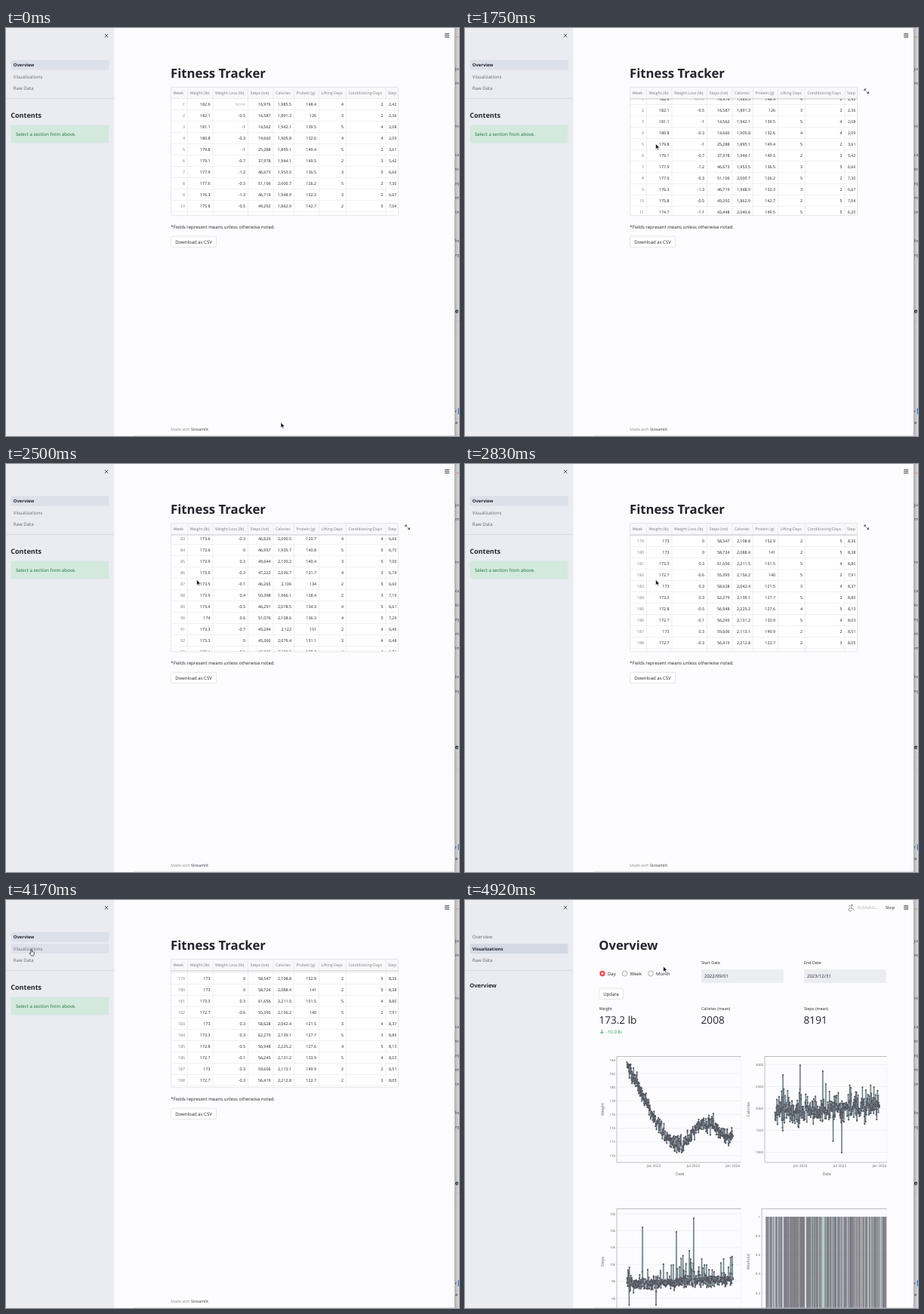
Write an HTML page that moves like this. It is 600 px wide and 541 px high and loops after 5000 ms.

```html
<!DOCTYPE html>
<html lang="en">
<head>
<meta charset="utf-8">
<title>Fitness Tracker</title>
<style>
html, body { margin: 0; width: 100%; height: 100%; overflow: hidden; background: #fcfbfe; }
svg { display: block; width: 600px; height: 541px; }
text { font-family: 'Open Sans', 'Noto Sans', sans-serif; fill: #23242d; text-rendering: geometricPrecision; white-space: pre; }
</style>
</head>
<body>
<svg id="stage" viewBox="0 0 600 541" xmlns="http://www.w3.org/2000/svg"></svg>
<script>
const LOOP = 5000, STEPS = 60;
const MUTED = '#777882', AXIS = '#62636d', FAINT = '#b0b0b8';

// ---------- drawing helpers ----------
const text = (x, mid, str, size, attrs = '') =>
  `<text x="${x}" y="${(mid + size * 0.36).toFixed(2)}" font-size="${size}" ${attrs}>${str}</text>`;
const rect = (x, y, w, h, fill, attrs = '') =>
  `<rect x="${x}" y="${y}" width="${w}" height="${h}" fill="${fill}" ${attrs}/>`;
const line = (d, color, width = 0.6, attrs = '') =>
  `<path d="${d}" fill="none" stroke="${color}" stroke-width="${width}" ${attrs}/>`;
const group = (id, body, attrs = '') => `<g id="${id}" ${attrs}>${body}</g>`;
const button = (x, y, w, label) =>
  rect(x, y, w, 14.3, '#fff', 'rx="1.8" stroke="#d5d5db" stroke-width=".6"') +
  text(x + w / 2, y + 7.2, label, 6.05, MID);
const END = 'text-anchor="end"', MID = 'text-anchor="middle"';
const BOLD = 'font-weight="700"', SEMI = 'font-weight="600"', MEDIUM = 'font-weight="500"';
const tint = c => `style="fill:${c}"`;

function random(seed) {
  return () => {
    seed = (seed + 0x6d2b79f5) | 0;
    let v = Math.imul(seed ^ (seed >>> 15), 1 | seed);
    v = (v + Math.imul(v ^ (v >>> 7), 61 | v)) ^ v;
    return ((v ^ (v >>> 14)) >>> 0) / 4294967296;
  };
}

// Linear interpolation in rows of [key, ...values]
function along(keys, k) {
  const i = keys.findIndex(row => row[0] >= k);
  if (i < 0) return keys[keys.length - 1].slice(1);
  if (i === 0) return keys[0].slice(1);
  const a = keys[i - 1], b = keys[i], u = (k - a[0]) / (b[0] - a[0]);
  return a.slice(1).map((v, j) => v + (b[j + 1] - v) * u);
}

// ---------- table ----------
const WEEKS = 188, ROW = 15;
const edges = [218.5, 240.5, 274, 320.5, 354, 381.5, 414.5, 450.5, 503];
const heads = ['Week', 'Weight (lb)', 'Weight Loss (lb)', 'Steps (tot)', 'Calories',
  'Protein (g)', 'Lifting Days', 'Conditioning Days', 'Steps (mean)'];
const number = v => v.toLocaleString('en-US', { maximumFractionDigits: 1 });
const tenth = v => Math.round(v * 10) / 10 + 0;

const weightTrend = [[1, 182.6], [5, 179.9], [10, 175.5], [16, 172.8], [21, 174], [WEEKS, 173]];
const stepTrend = [[1, 16976], [4, 14143], [7, 49003], [20, 39000], [WEEKS, 60000]];

function weekOf(n) {
  const r = random(n * 31), vary = n > 1 ? r() - 0.5 : 0;
  return {
    weight: tenth(along(weightTrend, n)[0] + vary * 0.8),
    steps: Math.round(along(stepTrend, n)[0] * (1 + vary * 0.14)),
    calories: tenth(1850 + n + r() * 200),
    protein: tenth(120 + r() * 34),
    lifting: 2 + Math.floor(r() * 4),
    conditioning: 2 + Math.floor(r() * 4)
  };
}

function tableRow(n, y) {
  const w = weekOf(n);
  const loss = n > 1 ? tenth(w.weight - weekOf(n - 1).weight) : null;
  const cells = [n, w.weight, loss, w.steps, w.calories, w.protein, w.lifting, w.conditioning];
  return cells.map((v, i) => {
    const color = i === 0 ? MUTED : v === null ? FAINT : '#1c1d26';
    return text(edges[i + 1] - 3.5, y, v === null ? 'None' : number(v), 5.35, `${END} ${MEDIUM} ${tint(color)}`);
  }).join('') + text(507, y, number(w.steps / 7), 5.35, MEDIUM) +
    line(`M218.5 ${y + ROW / 2}H519.5`, '#e7e7ec');
}

function tableRows(scroll) {
  let out = '';
  const first = Math.floor(scroll / ROW) + 1;
  for (let n = first; n <= Math.min(first + 11, WEEKS); n++) out += tableRow(n, 86 + ROW * n - scroll);
  return out;
}

const tablePage =
  text(218, 60, 'Fitness Tracker', 16.75, BOLD) +
  rect(218.5, 78.5, 301, 170.2, '#fff') +
  group('rows', '', 'clip-path="url(#body)"') +
  rect(218.5, 78.5, 301, 14.8, '#f8f8fb') +
  `<g clip-path="url(#head)">${heads.map((h, i) =>
    text(edges[i] + 3, 86.3, h, 5.25, tint(MUTED))).join('')}</g>` +
  line(edges.slice(1).map(x => `M${x} 78.5V248.7`).join(''), '#e4e4e9') +
  line('M218.5 93.6H519.5', '#dcdce2') +
  group('shade', rect(218.5, 93.6, 301, 2.4, 'url(#drop)')) +
  rect(218.5, 78.5, 301, 170.2, 'none', 'rx="1.5" stroke="#dcdce2" stroke-width=".7"') +
  group('expand', line('M529 83.4V81.1h2.3M529.2 81.3l2 2M534.6 84.2v2.3h-2.3M534.4 86.3l-2-2', '#3d3e48', 0.9)) +
  text(218.3, 264, '*Fields represent means unless otherwise noted.', 6.05) +
  button(218.5, 276.3, 60, 'Download as CSV') +
  text(218.3, 532.2, `Made with <tspan ${SEMI} ${tint('#62636d')}>Streamlit</tspan>`, 5.2, tint('#8c8d96'));

// ---------- charts ----------
const DAYS = 486;
const rnd = random(7), spread = () => rnd() + rnd() + rnd() - 1.5;
const rare = (chance, size) => rnd() < chance ? rnd() * size : 0;

// One value per day; peaks are a few outstanding [x, y] points
function series(x0, x1, peaks, value) {
  const pts = Array.from({ length: DAYS }, (_, i) => {
    const u = i / (DAYS - 1);
    return [x0 + (x1 - x0) * u, value(u)];
  });
  for (const [x, y] of peaks) pts[Math.round((x - x0) / (x1 - x0) * (DAYS - 1))][1] = y;
  const at = pts.map(p => p.map(v => v.toFixed(1)).join(' '));
  const path = 'M' + at.join('L');
  return line(path, '#5fb39a', 1.1, 'opacity=".45" transform="translate(-.4 0)"') +
    line(path, '#7f9fc6', 1.1, 'opacity=".4" transform="translate(.5 0)"') +
    line(path, '#53565f', 0.55) +
    line(at.map(p => `M${p}h0`).join(''), '#56555e', 2.2, 'stroke-linecap="round"');
}

function chart({ x, y, right, bottom, title, ticks, y0, dy, dates, data }) {
  const label = `${MID} ${tint(AXIS)}`, midX = x + (right - x) / 2 + 1.5;
  const titleX = x < 300 ? 182 : 375.5, titleY = y + 70;
  const months = ['Jan 2023', 'Jul 2023', 'Jan 2024'];
  return ticks.map((t, i) => line(`M${x} ${y0 + i * dy}H${right}`, '#e3e3e8', 0.5) +
      text(x - 2, y0 + i * dy, t, 4.4, `${END} ${tint(AXIS)}`)).join('') +
    line(`M${right} ${y}V${bottom}`, '#efeff3', 0.5) +
    line(`M${right} ${y}H${x}V${bottom}H${right}`, '#a3a4aa', 0.7) + data +
    text(titleX, titleY, title, 5.3, `transform="rotate(-90 ${titleX} ${titleY})" ${label}`) +
    (dates ? months.map((m, i) => text(dates + i * 52.3, 352.3, m, 4.7, label)).join('') +
      text(midX, 362.8, 'Date', 5.3, label) : '');
}

// Tick labels counting down from a top value
const countdown = (top, step, count, show = String) =>
  Array.from({ length: count }, (_, i) => show(top - i * step));

const weightLine = [[0, 220], [0.08, 237], [0.25, 288], [0.4, 318], [0.52, 326], [0.68, 297], [0.8, 299], [0.96, 318], [1, 310]];
const weightData = series(214.5, 355, [[287, 335], [329, 283]],
  u => along(weightLine, u)[0] + spread() * 11);
const calorieData = series(410.5, 549, [[444, 219], [474, 227], [487.5, 320], [499, 335]],
  u => 283 - 11 * u * u + spread() * 17 - rare(0.1, 24) - rare(0.02, 35) + rare(0.01, 25));
const stepData = series(214.5, 355, [[217.5, 537], [235, 434], [253, 537], [280, 440], [303, 422]],
  u => 511 - 8 * u + spread() * 8 - rare(0.16, 22) - rare(0.025, 45));

let bars = '';
for (let x = 398.5; x < 558; x += 0.66) {
  const hue = 150 + rnd() * 70, gap = rnd() < 0.2;
  bars += rect(x.toFixed(2), 420, 0.68, 122, gap ? `hsl(${hue} 25% ${55 + rnd() * 42}%)` : `hsl(265 5% ${34 + rnd() * 10}%)`);
}

// ---------- second page ----------
const radio = (x, label, on) =>
  `<circle cx="${x}" cy="97.5" r="3.4" fill="${on ? '#f2474b' : '#fff'}" stroke="${on ? '#f2474b' : '#85868f'}" stroke-width=".7"/>` +
  (on ? `<circle cx="${x}" cy="97.5" r="1.4" fill="#fff"/>` : '') + text(x + 7, 97.5, label, 6);
const dateField = (x, label, value) => text(x, 83.3, label, 5.35) +
  rect(x, 92, 109, 18, '#ecedf3', 'rx="1.8"') + text(x + 4, 101, value, 6);
const metric = (x, label, value) => text(x, 144, label, 5.3) + text(x - 0.4, 159, value, 13.6);

const formPart =
  text(177.3, 60, 'Overview', 16.6, BOLD) +
  radio(182, 'Day', true) + radio(211.5, 'Week') + radio(246, 'Month') +
  dateField(313, 'Start Date', '2022/09/01') + dateField(449, 'End Date', '2023/12/31') +
  button(177.5, 117.3, 32, 'Update');
const metricPart =
  metric(177.8, 'Weight', '173.2 lb') + metric(313, 'Calories (mean)', '2008') +
  metric(449, 'Steps (mean)', '8191') +
  line('M181.3 171.7v5.4M179 174.9l2.3 2.3 2.3-2.3', '#1f9c48', 0.8) +
  text(187, 174.5, '-10.0 lb', 6, `${MEDIUM} ${tint('#1f9c48')}`);
const thousands = v => v + 'k', decimal = v => String(tenth(v));
const chartPart =
  chart({ x: 201, y: 207.5, right: 365.5, bottom: 348, title: 'Weight', ticks: countdown(184, 2, 8),
    y0: 212, dy: 18.14, dates: 250, data: weightData }) +
  chart({ x: 397, y: 207.5, right: 558.5, bottom: 348, title: 'Calories', ticks: countdown(3000, 500, 5),
    y0: 218.5, dy: 29, dates: 444.2, data: calorieData }) +
  chart({ x: 201, y: 409.5, right: 365.5, bottom: 550, title: 'Steps', ticks: countdown(16, 2, 6, thousands),
    y0: 416, dy: 22.4, data: stepData }) +
  chart({ x: 393, y: 409.5, right: 558.5, bottom: 550, title: 'Workout', ticks: countdown(1, 0.2, 5, decimal),
    y0: 420, dy: 25.3, data: bars });

const running =
  `<circle cx="512.6" cy="6.8" r="1" fill="${MUTED}"/>` +
  line('M512 8.4l-1 2.8h2.8l1.4 2.6M508.3 8l2-.5 1.6 1M510 10.4a2.2 2.2 0 1 0 2.4 2.8', MUTED, 0.8) +
  text(519.8, 10, 'RUNNING...', 5.2, tint(FAINT)) + text(557, 10, 'Stop', 5.6);

// ---------- window around the pages ----------
const scraps = ['ju', 'me', '', '', 'ina', '', 'ca', 'tiv', 'ng', 'ma', 'im', '', 'he', 'ng'];
const behind =
  rect(594, 0, 6, 541, '#dcdcdf') + rect(594, 0, 6, 541, 'url(#edge)') +
  rect(595, 11.6, 5, 1, '#e08a62') +
  scraps.map((s, i) => text(595, 54 + i * 19, s, 5.6, tint('#3a3b40'))).join('') +
  text(594.8, 375, 'e', 8, BOLD) + line('M600 388.5H596V406H600', '#bbbbc0') +
  text(594.8, 508, 'r', 5.6) + rect(598.6, 504, 1.4, 8, '#4a86d0') + text(595, 523, 'a', 5.6);

const fade = (id, dir, alpha) => `<linearGradient id="${id}" ${dir}>
  <stop stop-opacity="${alpha}"/><stop offset="1" stop-opacity="0"/></linearGradient>`;

document.getElementById('stage').innerHTML = `<defs>
  <clipPath id="body"><rect x="218.5" y="93" width="298.7" height="155.5"/></clipPath>
  <clipPath id="head"><rect x="218.5" y="78" width="298.5" height="17"/></clipPath>
  ${fade('drop', 'x2="0" y2="1"', 0.13)}${fade('edge', '', 0.22)}</defs>` +
  rect(0, 0, 600, 541, '#fcfbfe') + behind + rect(0, 0, 143.3, 541, '#eaecf2') +
  line('M130.8 7.9l4.4 4.4M135.2 7.9l-4.4 4.4', '#2b2c36', 0.8) +
  group('nav', '') + rect(0, 93, 143.3, 1, '#d8dae1') +
  group('aside1', text(6.3, 115.5, 'Contents', 9, BOLD) + rect(6.5, 128.5, 130, 24, '#d3e9dd', 'rx="1.8"') +
    text(13, 140.7, 'Select a section from above.', 6.12, tint('#177233'))) +
  group('aside2', text(6.3, 113.2, 'Overview', 7.5, BOLD)) +
  group('table', tablePage) +
  group('form', formPart) + group('metrics', metricPart) + group('charts', chartPart) +
  group('running', running) +
  line('M581.2 7.7h6M581.2 9.9h6M581.2 12.1h6', '#2b2c36', 0.9) +
  line('M170 540.7H594', '#c9c9ce') +
  group('arrow', '<path d="M0 0V7.2L1.7 5.7 2.8 8.1 4 7.6 2.9 5.3H5.2Z" fill="#111" stroke="#fff" stroke-width=".6"/>') +
  group('hand', '<path d="M2.2 5.2V1Q2.2.2 2.9.2T3.6 1V3.4Q5.2 3 6.6 4.2V6.4L5.8 8.6H2.9L.5 5.4Q.9 4.4 2.2 5.2Z" fill="#fff" stroke="#1c1c20" stroke-width=".75" stroke-linejoin="round"/>');

// ---------- timeline, in twelfths of a second ----------
const pointer = [[1, 364, 523], [6, 280, 225], [8, 215, 252], [14, 77.3, 69.3], [15, 72, 66],
  [18, 252.6, 153.5], [40, 252.6, 153.5], [43, 235, 290], [47, 48, 98], [50, 33.6, 65.3],
  [52, 33.6, 65.3], [57, 210, 88], [59, 262.7, 88]];
const SCROLL = 20, FLING = 27, LAND = 34, CLICK = 53, FORM = 54, METRICS = 56, CHARTS = 57;
const bottomEdge = WEEKS * ROW - 153;

// A slow drag that gathers speed, a long fling, then a small rebound at the end
function scrollAt(k) {
  const drag = 7 * Math.max(0, Math.min(k, FLING) - SCROLL) ** 1.93;
  const u = Math.max(0, Math.min(1, (k - FLING) / (LAND - FLING)));
  const rebound = 2 * Math.max(0, Math.min(1, (39 - k) / 4));
  return drag + (bottomEdge + rebound - drag) * u * u * (3 - 2 * u);
}

const el = id => document.getElementById(id);
const show = (id, on) => { el(id).style.display = on ? '' : 'none'; };

function drawNav(active, hover) {
  el('nav').innerHTML = ['Overview', 'Visualizations', 'Raw Data'].map((name, i) => {
    const y = 49 + i * 15.5, on = i === active;
    const back = on ? (i ? '#d3d9e3' : '#dce0e9') : i === hover ? '#dee1ea' : 'none';
    return rect(6.5, y - 6.5, 130, 13, back, 'rx="1.8"') +
      text(9.8, y, name, on ? 5.85 : 6.1, on ? BOLD : tint('#646671'));
  }).join('');
}

function draw(k) {
  const [x, y] = along(pointer, k), scroll = scrollAt(k);
  const inNav = x > 6.5 && x < 136.5 && y > 42.5 && y < 86.5;
  const moved = k >= FORM;
  drawNav(k >= CLICK ? 1 : 0, inNav ? Math.floor((y - 42.5) / 15.5) : -1);
  show('hand', inNav);
  show('arrow', !inNav);
  el('hand').setAttribute('transform', `translate(${x - 2.9} ${y})`);
  el('arrow').setAttribute('transform', `translate(${x} ${y})`);
  el('rows').innerHTML = tableRows(scroll);
  show('shade', scroll > 0);
  show('expand', x > 218 && x < 520 && y > 78 && y < 249);
  show('table', !moved);
  show('aside1', !moved);
  show('aside2', moved);
  show('form', moved);
  show('metrics', k >= METRICS);
  show('charts', k >= CHARTS);
  show('running', k >= CLICK);
}

const begin = performance.now();
let last = -1;
function tick() {
  const t = (performance.now() - begin) % LOOP;
  const k = Math.floor((t + 4) * STEPS / LOOP) % STEPS;
  if (k !== last) draw(last = k);
  requestAnimationFrame(tick);
}
tick();
</script>
</body>
</html>
```
